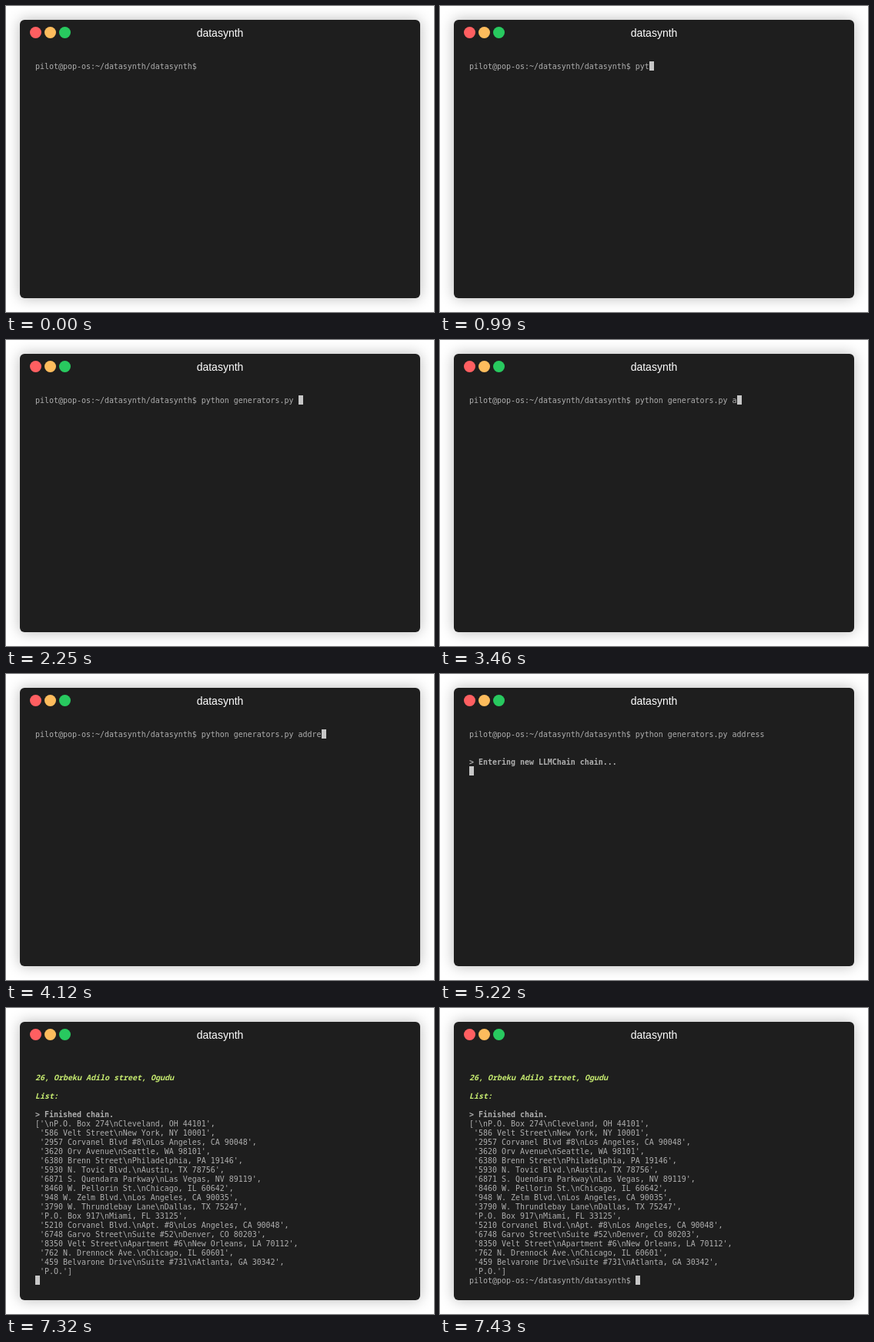
These frames come from a looping animation (556 px wide and 398 px high, 8 s). An HTML page:

```html
<!DOCTYPE html>
<html lang="en">
<head>
<meta charset="utf-8">
<title>datasynth</title>
<style>
  html, body { margin: 0; width: 100%; height: 100%; overflow: hidden; background: #fff; }
  .window {
    position: absolute; left: 18px; top: 18px; width: 520px; height: 362px;
    border-radius: 6px; background: #1e1e1e; box-shadow: 0 0 18px rgba(0, 0, 0, .28);
  }
  .dot { position: absolute; top: 9px; width: 15px; height: 15px; border-radius: 50%; }
  .title {
    position: absolute; left: 0; right: 0; top: 9px; text-align: center; color: #fff;
    font: 14px/16px "Liberation Sans", Arial, sans-serif;
  }
  #screen { position: absolute; left: 20px; top: 54px; color: #afafaf; }
  /* font size chosen so one character cell is 6px wide */
  .row { height: 12px; white-space: pre; font: 9.966px/13px "DejaVu Sans Mono", monospace; }
  .bold { font-weight: bold; }
  .prompt { font: italic bold 10px/12px "Noto Sans Mono", monospace; color: #c8ed71; }
  #cursor { position: absolute; width: 6px; height: 12px; background: #c7c7c7; }
</style>
</head>
<body>
<div class="window">
  <div class="dot" style="left:13px;background:#ff5f61"></div>
  <div class="dot" style="left:32px;background:#fdbc5d"></div>
  <div class="dot" style="left:51px;background:#28c95f"></div>
  <div class="title">datasynth</div>
  <div id="screen"><div id="rows"></div><div id="cursor"></div></div>
</div>
<script>
const LOOP = 8000, ROWS = 24, CELL_W = 6, CELL_H = 12;
const SHELL = 'pilot@pop-os:~/datasynth/datasynth$ ';
const COMMAND = 'python generators.py address';

// [time, characters of the command shown]; the jump to 21 is a tab completion
const typing = [
  [500, 1], [770, 2], [990, 3], [1070, 4], [1210, 5], [1300, 6], [1480, 7],
  [1720, 8], [1820, 9], [1920, 10], [2020, 11], [2250, 21],
  [3460, 22], [3640, 23], [3780, 24], [3970, 25], [4120, 26], [4360, 27], [4550, 28]
];
const ENTER = 4680, CHAIN = 5220, ASK = 5320, RESULT = 7320, DONE = 7430;

const styled = (style, text) => text.split('\n').map(line => ({ style, text: line }));

const chainStart = [
  ...styled('', '\n'),
  ...styled('bold', '> Entering new LLMChain chain...')
];

const question = [
  ...styled('', 'Prompt after formatting:'),
  ...styled('prompt', `Generate a list of U.S. postal addresses separated by double newlines.

Make them as realistic and diverse as possible.
Include some company address, P.O. boxes, apartment complexes, etc.
Ensure the addresses are fake.

Reference Format:
5163 Quelbin Drive, Apt 7C,
Austin, TX 78748

47, Tolvemarden garden estate, Ogudu

26, Orbeku Adilo street, Ogudu

List:`)
];

const result = [
  ...styled('', ''),
  ...styled('bold', '> Finished chain.'),
  ...styled('', String.raw`['\nP.O. Box 274\nCleveland, OH 44101',
 '586 Velt Street\nNew York, NY 10001',
 '2957 Corvanel Blvd #8\nLos Angeles, CA 90048',
 '3620 Orv Avenue\nSeattle, WA 98101',
 '6380 Brenn Street\nPhiladelphia, PA 19146',
 '5930 N. Tovic Blvd.\nAustin, TX 78756',
 '6871 S. Quendara Parkway\nLas Vegas, NV 89119',
 '8460 W. Pellorin St.\nChicago, IL 60642',
 '948 W. Zelm Blvd.\nLos Angeles, CA 90035',
 '3790 W. Thrundlebay Lane\nDallas, TX 75247',
 'P.O. Box 917\nMiami, FL 33125',
 '5210 Corvanel Blvd.\nApt. #8\nLos Angeles, CA 90048',
 '6748 Garvo Street\nSuite #52\nDenver, CO 80203',
 '8350 Velt Street\nApartment #6\nNew Orleans, LA 70112',
 '762 N. Drennock Ave.\nChicago, IL 60601',
 '459 Belvarone Drive\nSuite #731\nAtlanta, GA 30342',
 'P.O.']`)
];

const rows = document.getElementById('rows');
const cursor = document.getElementById('cursor');
const steps = [...typing.map(([time]) => time), ENTER, CHAIN, ASK, RESULT, DONE];

function linesAt(t) {
  const typed = typing.reduce((count, [time, shown]) => t >= time ? shown : count, 0);
  const lines = styled('', SHELL + COMMAND.slice(0, typed));
  if (t >= CHAIN) lines.push(...chainStart);
  if (t >= ASK) lines.push(...question);
  if (t >= RESULT) lines.push(...result);
  if (t >= ENTER) lines.push({ style: '', text: t >= DONE ? SHELL : '' });
  return lines.slice(-ROWS);
}

function draw(t) {
  const lines = linesAt(t);
  rows.replaceChildren(...lines.map(({ style, text }) => {
    const row = document.createElement('div');
    row.className = 'row ' + style;
    row.textContent = text;
    return row;
  }));
  cursor.style.left = lines.at(-1).text.length * CELL_W + 'px';
  cursor.style.top = (lines.length - 1) * CELL_H + 'px';
  cursor.style.visibility = t < steps[0] ? 'hidden' : 'visible';
}

const start = performance.now();
let shownStep = -1;

function tick() {
  const t = (performance.now() - start) % LOOP;
  const step = steps.filter(time => t >= time).length;
  if (step !== shownStep) {
    shownStep = step;
    draw(t);
  }
  requestAnimationFrame(tick);
}
tick();
</script>
</body>
</html>
```
